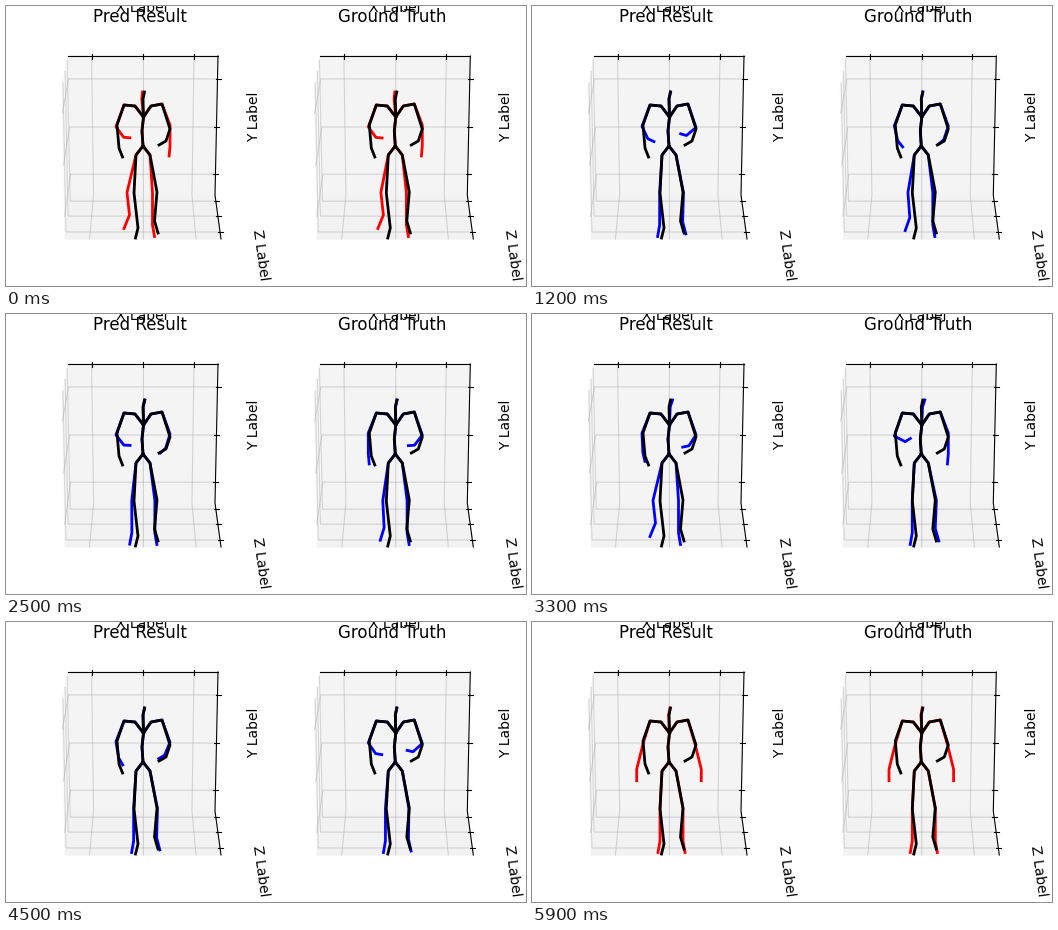
Write a matplotlib script that moves like this. It is 520 px wide and 280 px high and loops after 6 s.

```python
import numpy as np
import matplotlib.pyplot as plt
from matplotlib.animation import FuncAnimation
from matplotlib.patches import Polygon

W, H, DPI = 520, 280, 100
FRAMES, INTERVAL = 60, 100
OFFSETS = (0, 252.3)
MID = 137
LEFT, RIGHT = -1, 1
FORECAST, STAND, END = 1.0, 5.0, 5.9

plt.rcParams["font.family"] = "DejaVu Sans"
fig = plt.figure(figsize=(W / DPI, H / DPI), dpi=DPI, facecolor="white")
ax = fig.add_axes([0, 0, 1, 1])
ax.set_xlim(0, W)
ax.set_ylim(H, 0)
ax.axis("off")

# Corners of the visible box: back/front, top/bottom, left/right.
BTL, BTR, BBL, BBR, FTL, FBL, FBR = np.array(
    [(62, 50), (212, 50), (65, 189), (209, 189), (56, 82), (59, 233), (215, 233)], float)
X_TICKS = (0.157, 0.503, 0.84)
Y_TICKS = (0.165, 0.511, 0.85)
Z_TICKS = (0.14, 0.48, 0.84)


def mix(a, b, u):
    return a + (b - a) * u


def line(points, dx, **style):
    pts = np.array(points, float) + (dx, 0)
    return ax.plot(pts[:, 0], pts[:, 1], **style)[0]


def draw_box(dx):
    panes = (((BTL, BBL, FBL, FTL), "#f8f8f8"),
             ((BBL, BBR, FBR, FBL), "#f2f2f2"),
             ((BTL, BTR, BBR, BBL), "#f4f4f4"))
    for corners, color in panes:
        ax.add_patch(Polygon(np.array(corners) + (dx, 0), facecolor=color,
                             edgecolor=color, linewidth=0.8, zorder=0))

    grid = dict(color="#b0b0b0", lw=0.8, alpha=0.5, zorder=1)
    axis = dict(color="black", lw=0.8, zorder=2)
    for u in X_TICKS:
        top = mix(BTL, BTR, u)
        line([top, mix(BBL, BBR, u), mix(FBL, FBR, u)], dx, **grid)
        line([top - (0, 2.5), top + (0, 2.5)], dx, **axis)
    for u in Y_TICKS:
        right = mix(BTR, BBR, u)
        line([mix(FTL, FBL, u), mix(BTL, BBL, u), right], dx, **grid)
        line([right - (2, 0), right + (3, 0)], dx, **axis)
    for u in Z_TICKS:
        right = mix(BBR, FBR, u)
        line([mix(BTL, FTL, u), mix(BBL, FBL, u), right], dx, **grid)
        line([right - (2, 0), right + (3, 0)], dx, **axis)
    line([BTL, BTR], dx, **axis)
    line([BTR, BBR, FBR], dx, **axis)


def label(x, y, text, size, angle=0):
    ax.text(x, y, text, fontsize=size, rotation=angle, ha="center",
            va="baseline", rotation_mode="anchor", zorder=3)


def ease(u):
    return (1 - np.cos(np.pi * u)) / 2


def reach(point, length, angle, side):
    """End of a bone; angles run from straight down towards the body."""
    a = np.radians(angle)
    return point[0] - side * length * np.sin(a), point[1] + length * np.cos(a)


def walking_arm(side, lift):
    """Forearm folds from hanging (0) to the hand at the chest (1)."""
    elbow = (MID + side * 27, 119 + 5 * lift)
    bend = 115 * lift ** 1.2
    wrist = reach(elbow, 12 + 9 * np.exp(-6 * lift), bend, side)
    curl = 5 + 55 * np.sin(0.75 * np.pi * lift)
    hand = reach(wrist, 10 - 16 * lift * (1 - lift), bend + curl, side)
    return [elbow, wrist, hand]


def hanging_arm(side, spread):
    """Straight arm that opens away from the body."""
    elbow = (MID + side * 26, 119 + 3 * spread)
    wrist = reach(elbow, 23 + 3 * spread, 4 - 18 * spread, side)
    hand = reach(wrist, 11.5, 20 - 20 * spread, side)
    return [elbow, wrist, hand]


def leg(side, lift, center):
    knee = (center + side * (11.5 + 2.5 * lift), 186.5)
    ankle = (center + side * 11.5, 219 - 10 * lift)
    toe = (center + side * (13.5 + 3.5 * lift), 230.5 - 8 * lift)
    return [knee, ankle, toe]


def chains(l_arm, r_arm, l_leg, r_leg, nod=0):
    """Polylines of a whole figure from its four limbs."""
    neck, waist = (137.5, 111), (MID, 140)
    return [
        [(138.5 + nod, 86), (137 + nod * 0.6, 93), neck, (136, 125), waist],
        [neck, (129, 100), (118, 99), *l_arm],
        [neck, (145, 100), (156, 98), *r_arm],
        [waist, (130, 149), *l_leg],
        [waist, (144, 149), *r_leg],
    ]


REST = chains([(111, 119), (113, 142), (116.5, 151)],
              [(164, 123), (160, 135), (153, 139)],
              [(128, 187), (132, 222), (129.5, 232)],
              [(151, 186), (148.5, 215), (152, 227)])


def walk(t, swing_cycle, stride, sway, peak):
    """Arms swing in turn, highest around the peak time; legs step in turn."""
    swing = np.cos(2 * np.pi * swing_cycle(t))
    height = 0.38 + 0.6 * np.exp(-((t - peak) / 0.8) ** 2)
    step = np.cos(2 * np.pi * t / stride)
    center = 139 - sway * (step + 0.6)
    return (walking_arm(LEFT, height * (1 + swing) / 2),
            walking_arm(RIGHT, height * (1 - swing) / 2),
            leg(LEFT, max(0, step), center),
            leg(RIGHT, 0.5 * max(0, -step), center))


def stand(t):
    """Arms open while the raised right foot comes down."""
    u = ease((t - STAND) / (END - STAND))
    return (hanging_arm(LEFT, u), hanging_arm(RIGHT, mix(0.8, 1, u)),
            leg(LEFT, 0, 139.5), leg(RIGHT, 1 - u, 139.5))


def slowing(t):
    """The predicted gait loses pace after one full cycle."""
    s = t / 1.7
    return min(s, 1) + 0.42 * max(s - 1, 0)


def steady(t):
    return t / 1.65


figures = (
    ("Pred Result", dict(swing_cycle=slowing, stride=3.3, sway=2.5, peak=1.7)),
    ("Ground Truth", dict(swing_cycle=steady, stride=1.36, sway=1.5, peak=4.1)),
)
movers = []
for dx, (title, gait) in zip(OFFSETS, figures):
    draw_box(dx)
    label(133.6 + dx, 16, title, 12)
    label(136.2 + dx, 6, "X Label", 10)
    label(252 + dx, 111.2, "Y Label", 10, 90)
    label(250 + dx, 249.7, "Z Label", 10, -82.2)
    lines = [line(c, dx, color="red", lw=2, zorder=4) for c in REST]
    for c in REST:
        line(c, dx, color="black", lw=2, zorder=5)
    movers.append((dx, gait, lines))


def update(n):
    t = n * INTERVAL / 1000
    standing = t >= STAND
    color = "blue" if FORECAST <= t < STAND else "red"
    nod = -2 * np.cos(2 * np.pi * t / 6.6) ** 5
    changed = []
    for dx, gait, lines in movers:
        limbs = stand(t) if standing else walk(t, **gait)
        for ln, pts in zip(lines, chains(*limbs, nod)):
            x, y = np.array(pts, float).T
            ln.set_data(x + dx, y)
            ln.set_color(color)
            changed.append(ln)
    return changed


anim = FuncAnimation(fig, update, frames=FRAMES, interval=INTERVAL,
                     repeat=True, repeat_delay=0)
plt.show()
```
